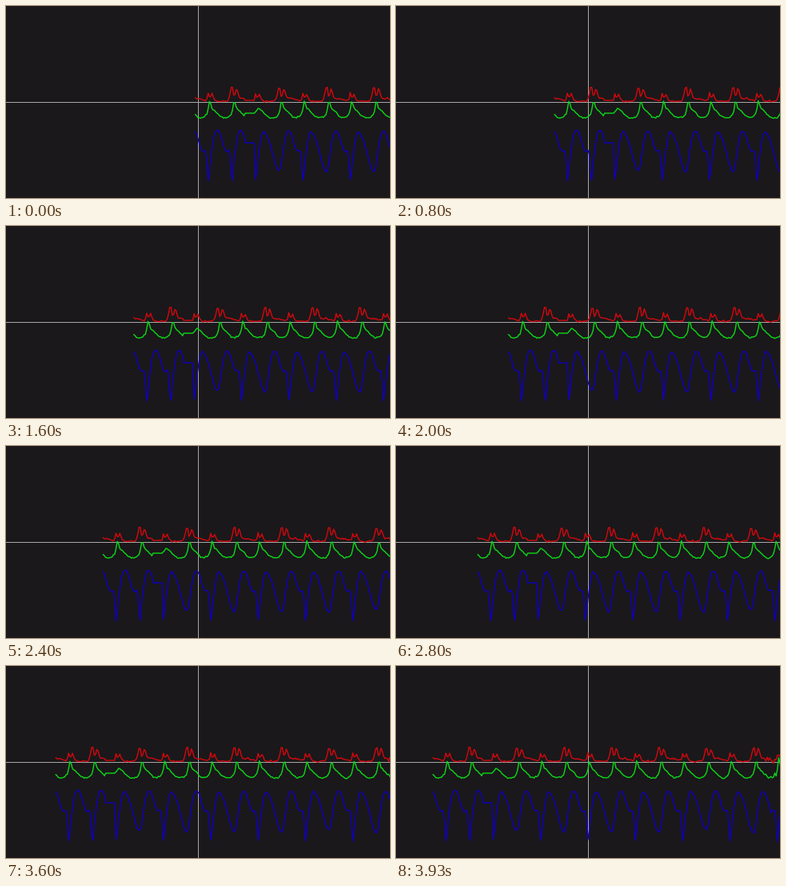
A matplotlib script that plays this animation: 480x240 px, repeating every 3990 ms.

```python
import matplotlib.pyplot as plt
import numpy as np
from matplotlib.animation import FuncAnimation

W, H, DPI = 480, 240, 100
FRAMES, LOOP = 60, 3990
PX = 72 / DPI          # one pixel in points
SAMPLE = 1.6           # pixels between readings
START, END = 236.2, 674
FIRST, BEAT = 252.3, 29.6
STALL = 2              # beat before which the readings freeze
ROUGH = 652            # readings get jittery from here on

rng = np.random.default_rng(4)
x = np.arange(START, END, SAMPLE)


def bump(center, height, left, right=None):
    """Bell curve with its own width on each side."""
    d = x - center
    width = np.where(d < 0, left, right or left)
    return height * np.exp(-0.5 * (d / width) ** 2)


def build():
    red = np.full_like(x, 119.0)
    green = np.full_like(x, 140.5)
    blue = np.full_like(x, 154.0)
    for k in range(-1, 15):
        c = FIRST + k * BEAT
        rounded = k % 2 == 1
        power = rng.uniform(0.93, 1.07)

        if rounded:
            red -= bump(c, 17 * power, 2, 1.5) + bump(c + 5.7, 13 * power, 1.4, 1.8)
            red -= bump(c + 13, 3.5, 7, 8)
        else:
            red -= bump(c + 0.2, 10 * power, 1) + bump(c + 4.2, 9 * power, 1.2, 2)

        peak = c + (3 if rounded else 1.8)
        spike = 0 if k == STALL else 10.5 * power
        green -= bump(peak, spike, 1.3) + bump(peak + 2, 12, 4.5, 6.5)

        if rounded and k > STALL:
            blue += bump(c, 51 * power, 8, 4.2)
        else:
            blue += bump(c - 7, 27, 4.5) + bump(c + 2, 36, 3)
            blue += bump(c, 28 * power, 1.2)

    stall = FIRST + STALL * BEAT
    frozen = (x > stall - 13) & (x < stall - 1)
    signals = {"blue": blue, "green": green, "red": red}
    for name, level in dict(red=118, green=134, blue=171).items():
        y = signals[name]
        y += rng.normal(0, np.where(x > ROUGH, 2.2, 0.5))
        y[frozen] = level
    return signals


def shift(i):
    # Two readings arrive per frame, and one extra late in the loop.
    return SAMPLE * (2 * i + (i >= 52))


fig = plt.figure(figsize=(W / DPI, H / DPI), dpi=DPI, facecolor="#1a181a")
ax = fig.add_axes([0, 0, 1, 1])
ax.set(xlim=(0, W), ylim=(H, 0))
ax.axis("off")
ax.axhline(H / 2, color="#a6a6a6", lw=PX)
ax.axvline(W / 2, color="#a6a6a6", lw=PX)

COLORS = {"blue": "#1000c0", "green": "#0cd818", "red": "#d2080e"}
curves = [ax.plot(x, y, color=COLORS[name], lw=1.4 * PX, zorder=3)[0]
          for name, y in build().items()]


def draw(i):
    for curve in curves:
        curve.set_xdata(x + 0.5 - shift(i))
    return curves


anim = FuncAnimation(fig, draw, frames=FRAMES, interval=LOOP / FRAMES,
                     repeat=True, repeat_delay=0, blit=False)
plt.show()
```
